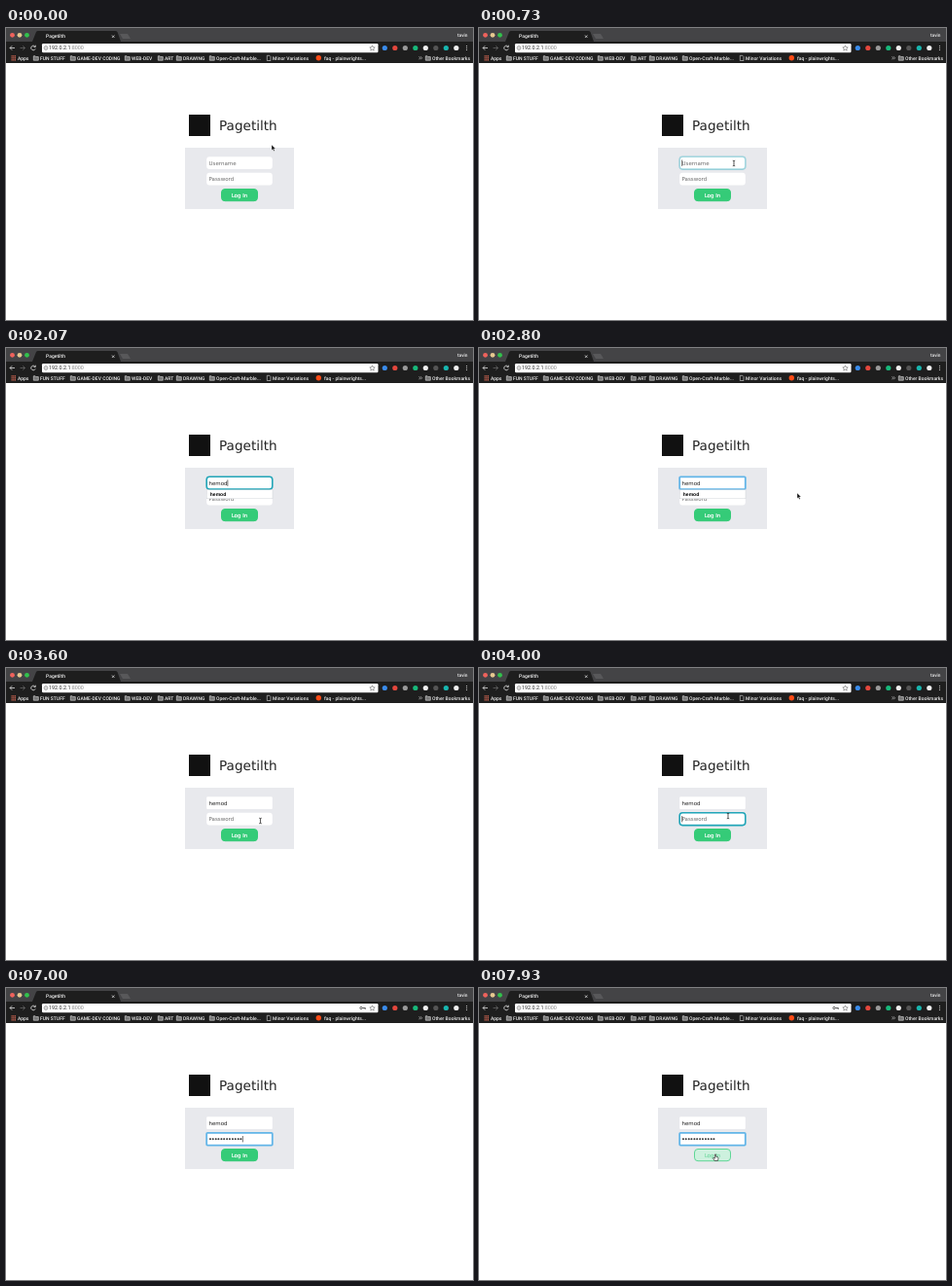
Animation of 480 by 300 pixels, one loop 8000 ms. Source, as an HTML page:

```html
<!DOCTYPE html>
<html lang="en">
<head>
<meta charset="utf-8">
<title>Login</title>
<style>
  html, body { margin: 0; width: 100%; height: 100%; overflow: hidden; background: #fff; }
  svg { display: block; width: 480px; height: 300px; text-rendering: geometricPrecision; }
  .ui { font: 500 5px Roboto, sans-serif; fill: #eee; }
  .form { font: 5.5px "DejaVu Sans", sans-serif; fill: #222; }
</style>
</head>
<body>
<svg viewBox="0 0 480 300">
  <rect width="480" height="300" fill="#fff"/>

  <!-- browser window -->
  <rect width="480" height="36" fill="#444446"/>
  <path d="M27 14L31 4Q31.500 3 33 3H112Q114 3 114.500 4L118 14H480V36H0V14Z" fill="#1e1e1e"/>
  <path d="M117 6h8l3 5h-8z" fill="#58585a"/>
  <circle cx="6.500" cy="7.300" r="2.400" fill="#f0625c"/>
  <circle cx="14" cy="7.300" r="2.400" fill="#e6c88f"/>
  <circle cx="21.500" cy="7.300" r="2.400" fill="#32c24c"/>
  <rect x="37" y="16" width="345.500" height="9.200" rx="1.200" fill="#fff"/>
  <g fill="none" stroke="#ddd" stroke-width=".8">
    <path d="M109 7.500l2.400 2.400m0-2.400l-2.400 2.400M9 20.500H4m2.200-2.200L4 20.500l2.200 2.200"/>
    <path d="M14.500 20.500h5m-2.200-2.200l2.200 2.200-2.200 2.200" stroke="#666"/>
    <path d="M29.800 19A2.300 2.300 0 1 0 30.200 21.300M30.300 17.700v1.800h-1.800"/>
    <path d="M424.500 29.300l1.200 1.500-1.200 1.500m1.800-3l1.200 1.500-1.200 1.500" stroke-width=".6"/>
  </g>
  <g fill="none" stroke="#666" stroke-width=".6">
    <circle cx="41" cy="20.500" r="1.900"/>
    <path d="M41 20.200v1.300m0-2.200v.5"/>
    <path d="M376.500 18l.8 1.700 1.900.2-1.400 1.300.4 1.900-1.700-.9-1.700.9.400-1.900-1.400-1.300 1.900-.2z"/>
  </g>
  <g id="key" fill="none" stroke="#555" stroke-width=".9">
    <circle cx="365" cy="20.500" r="1.200"/><path d="M366.200 20.500h3.200v1.300m-1.200-1.300v1"/>
  </g>
  <g id="extensions"></g>
  <g fill="#ddd"><circle cx="473.500" cy="18.500" r=".6"/><circle cx="473.500" cy="20.500" r=".6"/><circle cx="473.500" cy="22.500" r=".6"/></g>
  <g class="ui" id="bookmarks">
    <text x="41" y="10">Pagetilth</text>
    <text x="464" y="9" style="font-size:4.800px">tavin</text>
    <text x="44" y="22.400" style="font-size:5.400px;font-weight:400" fill="#222">192.0.2.1<tspan fill="#888">:8000</tspan></text>
    <text x="12" y="32.600">Apps</text>
    <path d="M5.500 28.800h4.500M5.500 30.800h4.500M5.500 32.800h4.500" stroke="#d96a55" stroke-width="1.200" stroke-dasharray="1.200 .450"/>
    <path d="M268.300 28.300h2.500l1.200 1.200v4h-3.700z" fill="none" stroke="#ddd" stroke-width=".6"/>
    <text x="274" y="32.600">Minor Variations</text>
    <circle cx="321.300" cy="30.800" r="2.700" fill="#ff4b16"/>
    <text x="327" y="32.600">faq - plainwrights...</text>
  </g>

  <!-- login page -->
  <rect x="188" y="89" width="22" height="22" fill="#111"/>
  <text class="form" x="219" y="105" style="font-size:13.600px">Pagetilth</text>
  <rect x="184" y="123" width="112" height="63" fill="#e8e9ed"/>
  <g class="form">
    <rect class="field" x="206.200" y="132.300" width="67.600" height="12.800" rx="3" fill="#fff"/>
    <rect class="field" x="206.200" y="148.800" width="67.600" height="12.800" rx="3" fill="#fff"/>
    <text id="user" x="208.500" y="140.700"></text>
    <text id="pass" x="208.500" y="157.200" stroke="#222"></text>
    <rect id="caret" width=".6" height="6.400" fill="#111"/>
  </g>
  <g id="suggest">
    <rect x="206.300" y="145.800" width="67.700" height="9" fill="#fff" stroke="#c9ccd1" stroke-width=".4"/>
    <text x="209.800" y="152.200" font-family="Liberation Sans, sans-serif" font-weight="700" font-size="5">hemod</text>
  </g>
  <rect id="button" x="221.500" y="165.500" width="37" height="12.200" rx="3.500"/>
  <text id="label" x="240" y="173.700" text-anchor="middle" font-family="DejaVu Sans, sans-serif" font-size="5.500" stroke-width=".2">Log In</text>

  <g id="cursor">
    <path id="arrow" d="M0 0V5.600L1.300 4.500 2.200 6.500 3.200 6 2.300 4.100H4z" fill="#111" stroke="#fff" stroke-width=".35"/>
    <path id="beam" d="M-1.200-2.800Q0-2.800 0-2V2Q0 2.800-1.200 2.800M1.200-2.800Q0-2.800 0-2M0 2Q0 2.800 1.200 2.800" fill="none" stroke="#111" stroke-width=".7"/>
    <path id="hand" d="M-.6 0Q0-.8.600 0V2.400L2.600 2.900Q3.200 3.100 3 4L2.400 6.500H-.8L-2.400 4Q-2.400 3-1.500 3.500L-.6 4.200Z" fill="#fff" stroke="#111" stroke-width=".6"/>
  </g>
</svg>
<script>
const $ = id => document.getElementById(id);
const show = (id, on) => $(id).setAttribute('visibility', on ? 'visible' : 'hidden');
const set = (el, attrs) => { for (const k in attrs) el.setAttribute(k, attrs[k]); };
const ramp = (t, from, to) => Math.max(0, Math.min(1, (t - from) / (to - from)));
const mix = (a, b, k) => `rgb(${a.map((v, i) => Math.round(v + (b[i] - v) * k))})`;
const fields = document.querySelectorAll('.field');

const folders = [[28, 'FUN STUFF'], [66, 'GAME-DEV CODING'], [122, 'WEB-DEV'], [156, 'ART'],
  [175, 'DRAWING'], [209, 'Open-Craft-Marble...'], [431, 'Other Bookmarks']];
$('bookmarks').innerHTML += folders.map(([x, name]) =>
  `<path d="M${x + .3} 28.800h1.800l.7.800h2.500v3.600h-5z" fill="#777" stroke="#ddd" stroke-width=".6"/>
   <text x="${x + 7}" y="32.600">${name}</text>`).join('');
$('extensions').innerHTML = ['#3a8bea', '#e4473d', '#999', '#18b87a', '#eee', '#555', '#18b5ae', '#eee']
  .map((c, i) => `<circle cx="${389.3 + i * 10.5}" cy="20.500" r="2.600" fill="${c}"/>`).join('');

const LOOP = 8000;
const NAME = 'hemod';
const nameKeys = [1330, 1530, 1670, 1870, 2070];
const passKeys = [4330, 4530, 4800, 5070, 5270, 5470, 5870, 6070, 6270, 6600, 6800, 7000];

// start, end and hide times, then start, control and end points
const moves = [
  [70, 600, 1330, 273, 120, 272, 134, 262, 139],
  [2530, 2800, 3130, 262, 139, 290, 170, 327, 149],
  [3130, 3700, 4000, 327, 149, 290, 186, 256, 152],
  [4000, 4260, 4330, 256, 152, 300, 182, 338, 206],
  [7270, 7700, LOOP, 338, 203, 280, 190, 243, 171]
];

function drawCursor(t) {
  const move = moves.find((m, i) => t < m[2] && (i === 0 || t >= m[0]));
  if (!move) {
    ['arrow', 'beam', 'hand'].forEach(id => show(id, false));
    return;
  }
  const [from, to, , x0, y0, cx, cy, x1, y1] = move;
  let k = ramp(t, from, to);
  k = k * k * (3 - 2 * k);
  const at = (a, b, c) => (1 - k) ** 2 * a + 2 * k * (1 - k) * b + k * k * c;
  const x = at(x0, cx, x1), y = at(y0, cy, y1);
  const inField = x > 206 && x < 274 && (y > 132 && y < 146 || y > 149 && y < 162);
  const inButton = x > 221 && x < 259 && y > 165 && y < 178;
  set($('cursor'), { transform: `translate(${x} ${y})` });
  show('beam', inField);
  show('hand', inButton);
  show('arrow', !inField && !inButton);
}

function drawRing(field, opacity, settled) {
  set(field, {
    stroke: settled ? '#62b5e8' : '#21a5b8',
    'stroke-opacity': opacity,
    'stroke-width': settled ? 1.8 : 1.6,
    rx: settled ? 1 : 3
  });
}

function drawForm(t) {
  const typed = nameKeys.filter(k => k <= t), dots = passKeys.filter(k => k <= t);
  const user = $('user'), pass = $('pass');
  user.textContent = typed.length ? NAME.slice(0, typed.length) : 'Username';
  pass.textContent = dots.length ? '•'.repeat(dots.length) : 'Password';
  user.style.fill = typed.length ? '#222' : '#6c6c6c';
  pass.style.fill = dots.length ? '#222' : '#6c6c6c';
  pass.style.fontSize = dots.length ? '4.86px' : '5.5px';
  pass.style.strokeWidth = dots.length ? .5 : 0;

  const onUser = t >= 600 && t < 2870, onPass = t >= 3700;
  drawRing(fields[0], onUser ? ramp(t, 600, 930) : 0, t >= 2530);
  drawRing(fields[1], onPass ? ramp(t, 3700, 3930) : 0, t >= 4330);
  show('suggest', t >= 1330 && t < 2870);
  show('key', t >= 4330);

  const keys = onPass ? dots : typed, text = onPass ? pass : user;
  const lastKey = keys.length ? keys[keys.length - 1] : onPass ? 3700 : 600;
  set($('caret'), {
    x: 208.5 + (keys.length ? text.getComputedTextLength() : 0),
    y: onPass ? 152 : 135.5
  });
  show('caret', (onUser || onPass) && (t - lastKey) % 1000 < 500);

  const hover = ramp(t, 7600, 7930);
  const green = [53, 203, 120], white = [255, 255, 255];
  const label = mix(white, [125, 220, 168], hover);
  set($('button'), { fill: mix(green, [205, 241, 222], hover), stroke: mix(green, [95, 214, 150], hover) });
  set($('label'), { fill: label, stroke: label });
}

function frame(now) {
  const t = now % LOOP;
  drawForm(t);
  drawCursor(t);
  requestAnimationFrame(frame);
}
requestAnimationFrame(frame);
</script>
</body>
</html>
```
